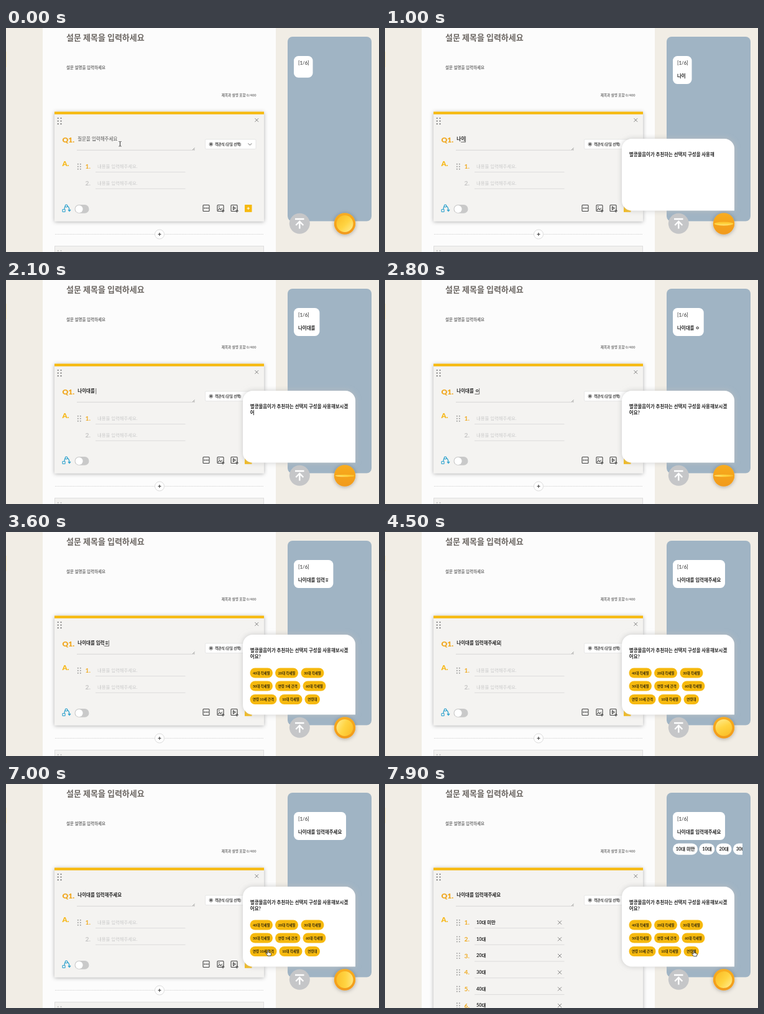
Animation, 600 px wide and 360 px high, one loop 8 s. Source, as an HTML page:

```html
<!DOCTYPE html>
<html lang="ko">
<head>
<meta charset="utf-8">
<style>
html, body { margin: 0; width: 100%; height: 100%; overflow: hidden; background: #f1ede5; }
svg { display: block; width: 600px; height: 360px; font-weight: 700; }
text { font-family: Lato, "Noto Sans CJK KR", "Noto Sans CJK", sans-serif; white-space: pre; }
</style>
</head>
<body>
<svg viewBox="0 0 600 360">
  <defs>
    <filter id="soft" x="-20%" y="-20%" width="140%" height="140%">
      <feDropShadow dx="0" dy="1" stdDeviation="3" flood-color="#000" flood-opacity=".3"/>
    </filter>
    <filter id="glow" x="-20%" y="-20%" width="140%" height="140%">
      <feDropShadow dx="0" dy="0" stdDeviation="4" flood-color="#c0c0c0" flood-opacity=".8"/>
    </filter>
    <linearGradient id="gold">
      <stop offset="0" stop-color="#fbc02a"/><stop offset=".55" stop-color="#ffd442"/><stop offset="1" stop-color="#ffe67c"/>
    </linearGradient>
    <linearGradient id="rim" x2="0" y2="1">
      <stop offset="0" stop-color="#f8ac20"/><stop offset="1" stop-color="#f19a1b"/>
    </linearGradient>
    <clipPath id="phone"><rect x="453" y="14" width="122" height="296"/></clipPath>
  </defs>
  <g id="page"></g>
  <g id="live"></g>
</svg>
<script>
const LOOP = 8000, AMBER = '#f6b90e', INK = '#222';
const page = document.getElementById('page'), live = document.getElementById('live');

// Drawing helpers
const rect = (x, y, w, h, fill, r = 0, more = '') =>
  `<rect x="${x}" y="${y}" width="${w}" height="${h}" rx="${r}" fill="${fill}" ${more}/>`;
const circle = (x, y, r, fill, more = '') => `<circle cx="${x}" cy="${y}" r="${r}" fill="${fill}" ${more}/>`;
const path = (d, color, width = 1, more = '') =>
  `<path d="${d}" fill="none" stroke="${color}" stroke-width="${width}" ${more}/>`;
const text = (x, y, size, s, fill = INK, more = '') =>
  `<text x="${x}" y="${y}" font-size="${size}" fill="${fill}" ${more}>${s}</text>`;
const regular = 'font-weight="400"', black = 'font-weight="900"';
const cross = (x, y, r) => path(`M${x - r} ${y - r}l${2 * r} ${2 * r}m0 ${-2 * r}l${-2 * r} ${2 * r}`, '#777', .9);

function dots(x, y, gapX, gapY, r, color) {
  let out = '';
  for (let i = 0; i < 6; i++) out += circle(x + i % 2 * gapX, y + (i >> 1) * gapY, r, color);
  return out;
}

// Advance width of mixed Hangul and digits
const measure = (s, size) => size * [...s].reduce((w, c) => w + (c > '\u3000' ? .92 : c === ' ' ? .193 : .58), 0);
const clamp = v => Math.max(0, Math.min(1, v));
const ease = v => (v = clamp(v), v * v * (3 - 2 * v));

// Keystrokes: time, committed text, syllable being composed
const keys = [
  [300, '', 'ㄴ'], [480, '', '나'], [680, '', '낭'], [900, '나', '이'],
  [1560, '나', '읻'], [1650, '나이', '대'], [1740, '나이', '댈'], [1830, '나이대', '르'],
  [1930, '나이대', '를'], [2040, '나이대를 ', ''],
  [2680, '나이대를 ', 'ㅇ'], [2810, '나이대를 ', '이'], [2940, '나이대를 ', '입'], [3080, '나이대를 입', 'ㄹ'],
  [3200, '나이대를 입', '려'], [3320, '나이대를 입', '력'], [3520, '나이대를 입력', 'ㅎ'],
  [3660, '나이대를 입력', '해'], [3760, '나이대를 입력', '핮'], [3860, '나이대를 입력해', '주'],
  [3960, '나이대를 입력해', '줏'], [4060, '나이대를 입력해주', '세'], [4160, '나이대를 입력해주', '셍'],
  [4280, '나이대를 입력해주세', '요'], [4500, '나이대를 입력해주세요', '']
];

// Suggestion rounds: text starts, choices arrive
const rounds = [[700, 1200], [1750, 2850], [3800, 4400]];
const prompt = ['별콩물음이가 추천하는 선택지 구성을 사용해보시겠', '어요?'];
const choices = [
  [392.5, 226.5, 36.5, '40대 각세별'], [433, 226.5, 37, '20대 각세별'], [474.5, 226.5, 37, '30대 각세별'],
  [392.5, 247.5, 36.5, '50대 각세별'], [433, 247.5, 40.5, '연령 5세 간격'], [477.5, 247.5, 37, '60대 각세별'],
  [392.5, 269, 43, '연령 10세 간격'], [439.5, 269, 37, '10대 각세별'], [480.5, 269, 24.5, '연령대']
];
const ages = ['10대 미만', '10대', '20대', '30대', '40대', '50대'];
const PICKED = 7550;

function drawPage() {
  page.innerHTML =
    rect(0, 0, 600, 360, '#f1ede5') + rect(0, 38, 1, 25, '#f6e6bf') +
    rect(59, 0, 375, 360, '#fcfcfc') +
    text(97, 19.5, 12.98, '설문 제목을 입력하세요', '#6b6662') +
    text(97, 65.8, 6.5, '설문 설명을 입력하세요', '#747474') +
    text(402.5, 110, 5.6, '제목과 설명 포함 0/400', '#747474', 'text-anchor="end"') +
    path('M79 331.5H415', '#cfcfcf', 1, 'stroke-dasharray="1.2 1.2"') +
    circle(247, 331.5, 7.5, '#fff', 'stroke="#d2d2d2" stroke-width=".8"') +
    path('M244.500 331.5h5m-2.500-2.500v5', '#444', 1.2) +
    rect(78.5, 350.5, 336, 20, '#f2f1ef', 0, 'stroke="#dedede"') +
    dots(83.7, 358, 4.8, 4.5, 1, '#bbb') +
    rect(453, 14, 135, 296.5, '#a0b4c4', 8);
}

function drawRow(i, filled) {
  const y = 222.3 + i * 26.7, on = filled || i === 0;
  return (on ? dots(115.8, y - 3.6, 4, 4, .95, '#999') : '') +
    text(127.5, y + 3.8, 10.3, i + 1 + '.', on ? '#efab24' : '#c6c6c6') +
    (filled ? text(147, y + 2.6, 7.4, ages[i]) + cross(281, y + .3, 3)
            : text(147, y + 2.6, 7.35, '내용을 입력해주세요.', '#cacaca', regular)) +
    path(`M144 ${y + 9.3}H288.500`, '#d6d6d6', .8);
}

function drawFooter() {
  const box = x => rect(x - 5, 284.5, 10, 10, 'none', 1, 'stroke="#444" stroke-width="1.1"');
  return path('M94 291.500Q94 286 97 286Q102 286 102 294m-2-2l2 2.500l2-2.500', '#35a5cf', 1.3) +
    rect(91, 291.5, 4, 4, '#f4f3f1', .5, 'stroke="#35a5cf" stroke-width="1.2"') +
    circle(97, 286, 1.8, '#f4f3f1', 'stroke="#35a5cf" stroke-width="1.2"') +
    rect(110.5, 284, 23, 13.8, '#c9c9c9', 6.9) + circle(117.6, 290.9, 6, '#fff') +
    box(322) + [319.3, 322, 324.7].map(x => circle(x, 289.5, 1, '#444')).join('') +
    box(345) + circle(342.8, 287.3, .9, '#444') +
    path('M341 293l2.500-3l2 2l2-2.500M346.500 294h5m-2.500-2.500v5', '#444', 1.1) +
    box(367) + path('M365.500 287v5l3.500-2.500zM369 294h5m-2.500-2.500v5', '#444', 1.1) +
    rect(384, 284, 11.5, 11.8, AMBER) + path('M387.500 289.900h4.500m-2.250-2.250v4.500', '#fff', 1);
}

function drawQuestion(t, typed, composing) {
  const value = typed + composing;
  if (!value) return text(115.3, 181.3, 7.5, '질문을 입력해주세요', '#555', regular);
  const end = 115.3 + measure(value, 7.5), start = 115.3 + measure(typed, 7.5);
  const caret = t < 4500 || (t < 7500 && t % 1000 >= 500);
  return text(115.3, 181.3, 7.5, value) +
    (composing ? path(`M${start} 183.300H${end}`, '#333', .7) : '') +
    (caret ? path(`M${end + .4} 174v9.500`, '#333', .7) : '');
}

function drawCard(t, typed, composing) {
  const filled = t >= PICKED;
  let out = `<g filter="url(#soft)">${rect(78, 134.5, 337, filled ? 300 : 176, '#f4f3f1', 1)}</g>` +
    rect(78, 134.5, 337, 4.2, AMBER) + dots(83.7, 145, 4.8, 4.6, 1.1, '#777') + cross(403.3, 148, 2.8) +
    text(90.5, 183.7, 12, 'Q1.', '#f0a822', black) + text(90.5, 222, 11.5, 'A.', '#f6b91c', black) +
    drawQuestion(t, typed, composing) +
    path('M114 196.300H304', '#cfcfcf', .8) + path('M300 196l3.500-3.500m-1.500 3.500l1.500-1.500', '#777', .7) +
    rect(320.5, 179, 81.5, 15.5, '#fff', 1.5, 'stroke="#dedede" stroke-width=".7"') +
    circle(329.8, 186.8, 2.8, '#fff', 'stroke="#555" stroke-width=".7"') + circle(329.8, 186.8, 1.7, '#444') +
    text(336, 188.9, 5.65, '객관식 (단일 선택)', '#333') +
    path('M389.500 185.500l2.900 2.700l2.900-2.700', '#555', .9);
  for (let i = 0; i < (filled ? ages.length : 2); i++) out += drawRow(i, filled);
  return out + (filled ? '' : drawFooter());
}

function drawPhone(t, value) {
  const w = Math.max(30.5, measure(value.trim(), 7.45) + 14);
  let out = rect(463, 45, w, value ? 45 : 34.8, '#fff', 7.5) + text(470, 59.3, 8, '[1/6]', INK, regular) +
    text(470, 79.8, 7.45, value);
  if (t >= PICKED) {
    let x = 463;
    for (const age of ages) {
      const width = measure(age, 7.4) + 9.5;
      out += rect(x, 95.5, width, 18.2, '#fff', 9) + text(x + 4.8, 107.3, 7.4, age);
      x += width + 2.4;
    }
  }
  return `<g clip-path="url(#phone)">${out}</g>`;
}

function drawPopup(t, round) {
  if (!round) return '';
  const [start, ready] = round, top = 178 - 13 * ease((t - ready) / 90);
  const count = Math.floor((t - start) / 12.8), first = prompt[0].length;
  let out = `<path d="M397 ${top}H546a16 16 0 0 1 16 16V293.500H397a16 16 0 0 1-16-16V${top + 16}a16 16 0 0 1 16-16z" fill="#fff" filter="url(#glow)"/>` +
    text(392.8, top + 27.9, 7.43, prompt[0].slice(0, count)) +
    text(392.8, top + 38.2, 7.43, prompt[1].slice(0, Math.max(0, count - first)));
  if (t >= ready) for (const [x, y, w, label] of choices)
    out += rect(x, y - 8, w, 16, AMBER, 8) +
      text(x + w / 2, y + 2, 5.45, label, '#33290c', 'text-anchor="middle"');
  return out;
}

function drawButtons(t, round) {
  const busy = round && t < round[1];
  const flip = busy ? Math.max(.13, Math.abs(Math.cos(Math.PI * (t - round[0]) / 700))) : 1;
  return circle(472.3, 314.3, 16.5, '#c5c6c8') +
    path('M465 307h14.500M472.300 322.500v-11.500m-6 6l6-6l6 6', '#fff', 2.4) +
    `<g filter="url(#soft)">${circle(545, 314.5, 17.2, 'url(#rim)')}</g>` +
    `<g transform="translate(545 314.500) scale(${busy ? 1.15 : 1} ${flip})">` +
    circle(0, 0, 13.4, 'url(#gold)', `transform="rotate(${45 + t * .045})"`) + '</g>';
}

function drawPointer(t) {
  if (t < 300) return path('M181.500 182.500h1.200l.8.7l.8-.7h1.200M183.500 183v6.500M181.500 190h1.200l.8-.7l.8.7h1.200', '#222', .9);
  if (t < 4700) return '';
  const a = ease((t - 4700) / 650), b = ease((t - 6000) / 700), c = ease((t - 7050) / 350);
  const x = 183 + 242.5 * a - 4 * b + 75.5 * c, y = 186 + 86.7 * a - 4 * b + .7 * c;
  const shape = x < 381 ? 'M0 0v9l2.200-2l1.500 3.300l1.500-.7l-1.500-3.100h3z'
    : 'M-1-1.500q1-1 1.700 0v3.500l3.500.8q1 .3.900 1.500l-.8 3.200h-4.800l-2.700-3.600q0-1.200 1.200-.8l1 .8z';
  return `<path transform="translate(${x} ${y})" d="${shape}" fill="#fff" stroke="#222" stroke-width=".8" stroke-linejoin="round"/>`;
}

function draw(t) {
  const [, typed, composing] = keys.findLast(k => k[0] <= t) || [0, '', ''];
  const round = rounds.findLast(r => r[0] <= t);
  live.innerHTML = drawCard(t, typed, composing) + drawPhone(t, typed + composing) +
    drawPopup(t, round) + drawButtons(t, round) + drawPointer(t);
}

drawPage();
const begin = performance.now();
function tick() {
  draw((performance.now() - begin) % LOOP);
  requestAnimationFrame(tick);
}
tick();
</script>
</body>
</html>
```
